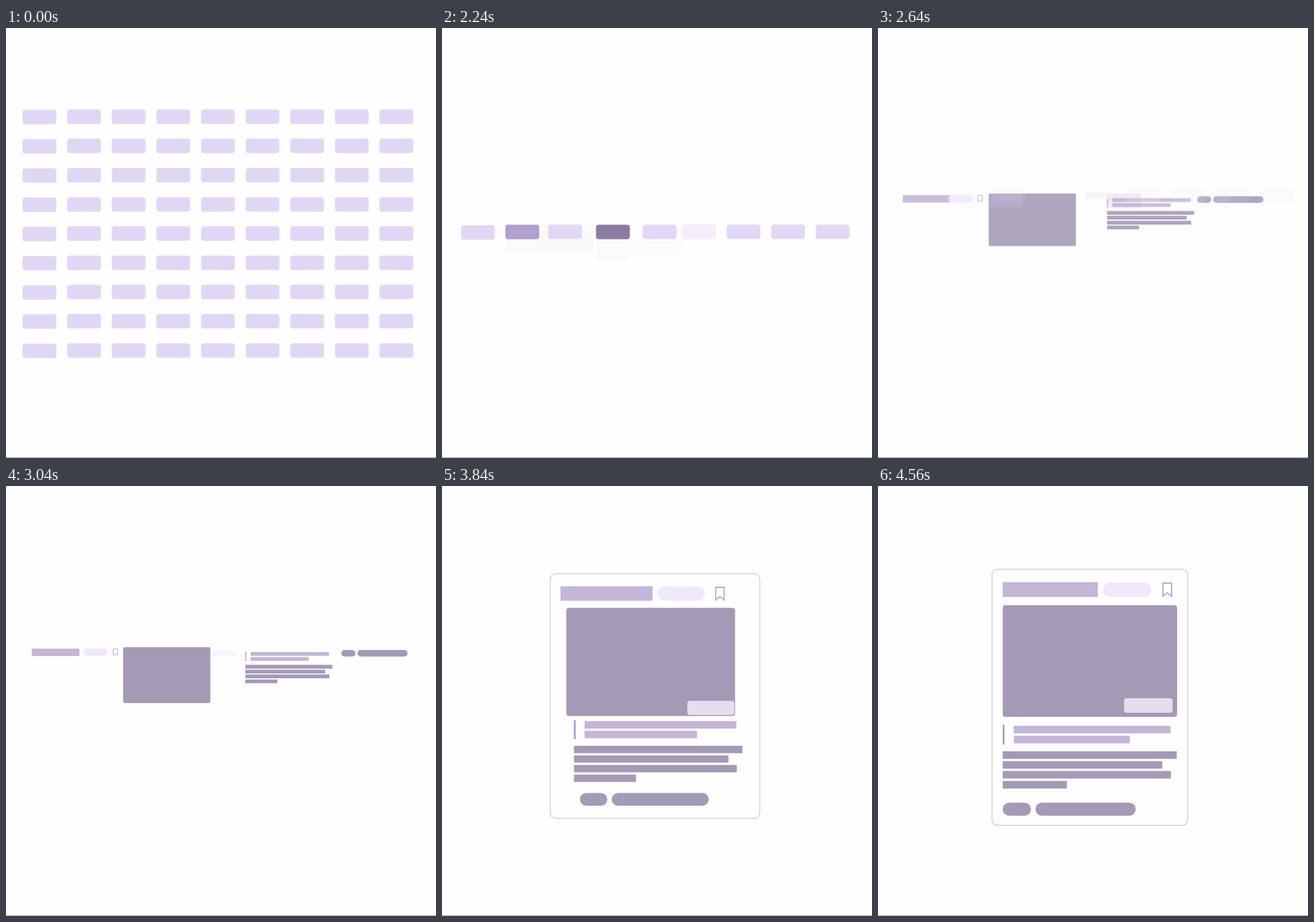
Recreate the animation shown at these times as an HTML page with a canvas. Size 624 px wide and 624 px high, loop 4640 ms.

```html
<!DOCTYPE html>
<html lang="en">
<head>
<meta charset="utf-8">
<title>Buttons to card</title>
<style>
html, body { margin: 0; width: 100%; height: 100%; overflow: hidden; background: #fefefe; }
canvas { display: block; }
</style>
</head>
<body>
<canvas id="stage" width="624" height="624"></canvas>
<script>
const LOOP = 4640, STEP = 80;
const ctx = document.getElementById('stage').getContext('2d');
const LILAC = '#e1d7f5', MAUVE = '#a59ab6', PALE = '#c4b6d7';

const mix = (a, b, p) => a + (b - a) * p;
const clamp = v => Math.min(1, Math.max(0, v));

// Bezier easing (.25, .1, .25, 1), solved by bisection
function ease(x) {
  if (x <= 0 || x >= 1) return clamp(x);
  const curve = (a, b, u) => 3 * a * u * (1 - u) ** 2 + 3 * b * u * u * (1 - u) + u ** 3;
  let lo = 0, hi = 1;
  for (let i = 0; i < 24; i++) {
    const mid = (lo + hi) / 2;
    if (curve(.25, .25, mid) < x) lo = mid; else hi = mid;
  }
  return curve(.1, 1, lo);
}
const phase = (t, start, length) => ease((t - start) / length);

function box(x, y, w, h, r, color, alpha = 1) {
  ctx.globalAlpha = alpha;
  ctx.fillStyle = color;
  ctx.beginPath();
  ctx.roundRect(x, y, w, h, r);
  ctx.fill();
}

// Parts are half size in the row and full size in the card.
// row: place in the row; from: offset where the part enters; card: final x, y, w, h
const part = (row, from, card, color, r = 0, extra = {}) => ({ row, from, card, color, r, ...extra });
const TEXT = [-128.5, 52.5], PILL = [-203, 53];
const parts = [
  part([37.5, 236], [-13.5, 57], [181, 139.5, 138, 21.5], PALE),
  part([112, 236], [-88, 57], [326.5, 140, 70.5, 21], '#f2e8fc', 10.5),
  part([155, 236], [-89, 54], [412.5, 140, 14.5, 21], '#b9aed0', 0, { bookmark: true }),
  part([170, 234], [-81, 54], [181, 173, 253, 162], MAUVE, 4, { enterHeight: 41 }),
  part([347.3, 240], TEXT, [181, 346.5, 2.5, 28.5], '#a695d0'),
  part([355, 241], TEXT, [197, 348, 227.5, 11], PALE),
  part([355, 248.3], TEXT, [197, 362.5, 168.5, 11], PALE),
  part([347.3, 259.5], TEXT, [181, 385, 252.5, 11], MAUVE),
  part([347.3, 266.5], TEXT, [181, 399.3, 231.5, 11], MAUVE),
  part([347.3, 273.6], TEXT, [181, 413.6, 244, 11], MAUVE),
  part([347.3, 280.7], TEXT, [181, 428, 93, 11], MAUVE),
  part([486.5, 238], PILL, [181, 459.5, 41, 19], MAUVE, 9.5),
  part([510, 238], PILL, [228.5, 459.5, 145.5, 19], MAUVE, 9.5)
];

function bookmark(x, y, w, h, color, alpha, scale) {
  const lw = 2 * scale, l = x + lw / 2, r = x + w - lw / 2, b = y + h - lw / 2;
  ctx.globalAlpha = alpha;
  ctx.strokeStyle = color;
  ctx.lineWidth = lw;
  ctx.beginPath();
  ctx.moveTo(l, b);
  ctx.lineTo(l, y + lw / 2);
  ctx.lineTo(r, y + lw / 2);
  ctx.lineTo(r, b);
  ctx.lineTo(x + w / 2, b - 5 * scale);
  ctx.closePath();
  ctx.stroke();
}

function drawPart(s, p, q) {
  const [cx, cy, cw, ch] = s.card;
  const scale = mix(.5, 1, q);
  const x = mix(s.row[0] + s.from[0] * (1 - p), cx, q);
  const y = mix(s.row[1] + s.from[1] * (1 - p), cy, q);
  let h = ch * scale;
  if (s.enterHeight) h = mix(s.enterHeight, h, p);
  if (s.bookmark) bookmark(x, y, cw * scale, h, s.color, p, scale);
  else box(x, y, cw * scale, h, s.r * scale, s.color, p);
}

function drawFrame(q) {
  const l = mix(33, 165.5, q), r = mix(634, 449.5, q);
  const top = mix(225, 120.8, q), bottom = mix(336, 492.3, q);
  ctx.globalAlpha = q;
  ctx.strokeStyle = '#cdc7da';
  ctx.lineWidth = 1.2;
  ctx.beginPath();
  ctx.roundRect(l, top, r - l, bottom - top, 8);
  ctx.stroke();
}

function drawLabel(p, q) {
  if (q < .2) box(300, 238, 34.5, 10, 2, '#f9f3fb', p * (1 - q * 5));
  const scale = mix(.5, 1, q);
  box(mix(342, 357, q), mix(369, 308, q), 70.5 * scale, 21 * scale, 4 * scale,
    '#e6deee', clamp((q - .45) / .45));
}

const tints = { 1: '#ae9fcd', 3: '#887a9f', 5: '#f6f0fa' };
const targets = { 0: 112, 1: 170, 3: 347.3, 4: 486.5 };

function drawButtons(d, p) {
  for (let row = 0; row < 9; row++) {
    for (let col = 0; col < 9; col++) {
      const x = 24 + 64.75 * col, y = 118.2 + 42.4 * row + (col ? 0 : .6);
      if (row !== 4) {
        box(x, y, 49, 21, 4, LILAC, 1 - d);
        continue;
      }
      const bx = mix(x, targets[col] || x + 14, p);
      const by = mix(y, col in targets ? 234 : 225, p);
      box(bx, by, 49, 21, 4, LILAC, 1 - p);
      if (tints[col]) {
        // Fade the tint in over the base, then fade both out together
        const a = d * (1 - p) / (1 - (1 - p) * (1 - d) || 1);
        ctx.globalAlpha = 1;
        if (p === 0) box(bx, by, 49, 21, 4, tints[col], d);
        else box(bx, by, 49, 21, 4, tints[col], a);
      }
    }
  }
}

function draw(now) {
  const t = Math.floor((now % LOOP) / STEP) * STEP;
  const d = phase(t, 1325, 300);
  const p = phase(t, 2197, 740);
  const q = phase(t, 3328, 740);
  ctx.globalAlpha = 1;
  ctx.fillStyle = '#fefefe';
  ctx.fillRect(0, 0, 624, 624);
  if (q > 0) drawFrame(q);
  if (p > 0) {
    parts.forEach(s => drawPart(s, p, q));
    drawLabel(p, q);
  }
  if (p < 1) drawButtons(d, p);
  box(0, 623, 624, 1, 0, '#a8a8a8');
  requestAnimationFrame(draw);
}
draw(performance.now());
</script>
</body>
</html>
```
